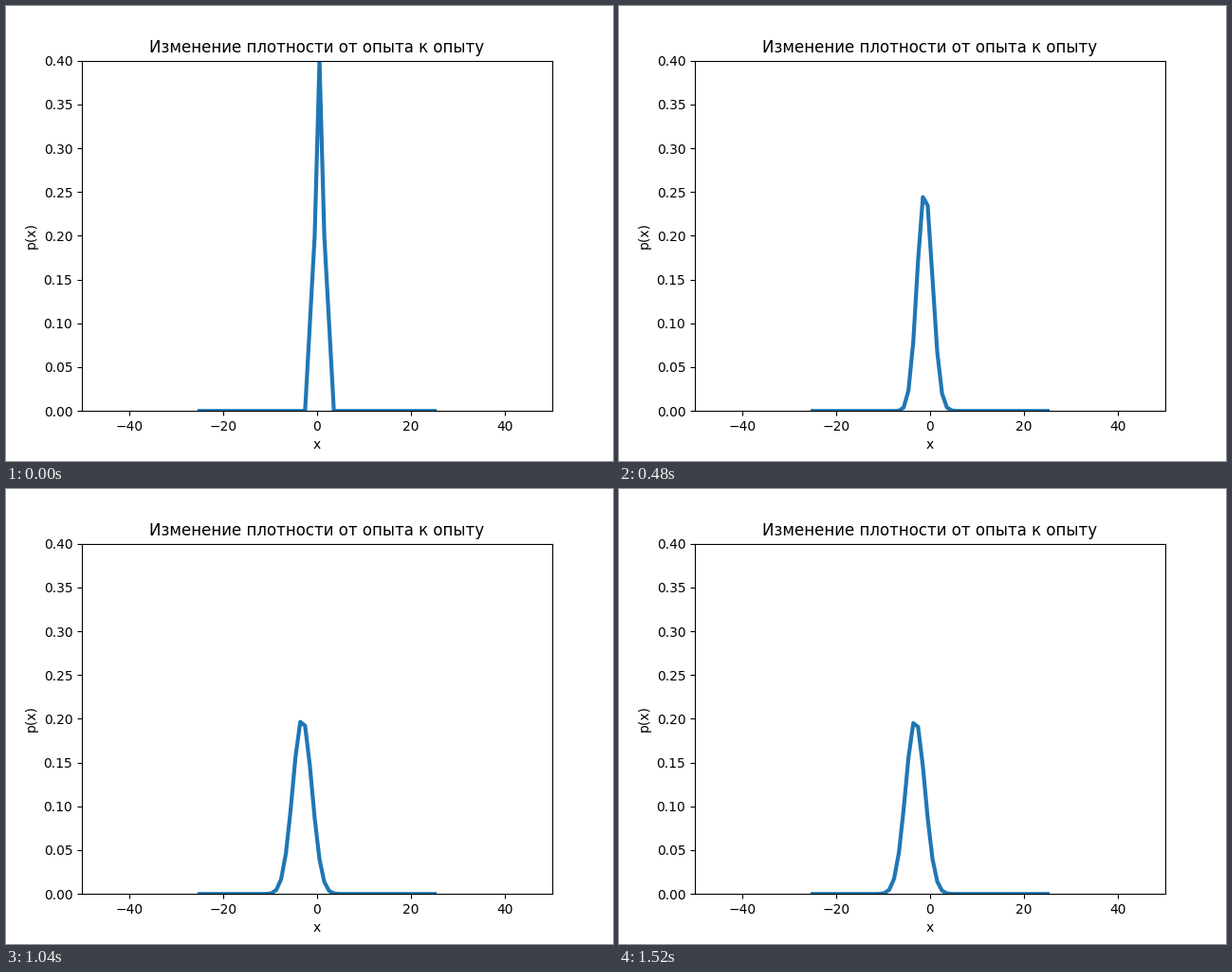
A matplotlib script that plays this animation: 640x480 px, repeating every 1600 ms.

```python
import numpy as np
import matplotlib.pyplot as plt
from matplotlib.animation import FuncAnimation

CELLS = 50
START = 25
FRAMES, INTERVAL = 20, 80
SENSOR_STD = 3.0  # in cells
KERNEL = np.array([0.1, 0.2, 0.4, 0.2, 0.1])

# One step and one reading per experiment, both in cells
STEPS = [0, 0, 1, 1, -1, -1, 1, 1, -1, -1]
READINGS = [18.92, 22.5, 20.9, 21.98, 16.36, 21.8, 23.89, 23.8, 22.51]

cells = np.arange(CELLS)
x = np.linspace(-25, 25, CELLS)


def predict(p, step):
    return np.roll(np.convolve(p, KERNEL, mode="same"), step)


def correct(p, reading):
    p = p * np.exp(-0.5 * ((cells - reading) / SENSOR_STD) ** 2)
    return p / p.sum()


def run_filter():
    p = predict((cells == START).astype(float), 0)
    history = [p]
    for i, step in enumerate(STEPS):
        p = predict(p, step)
        history.append(p)
        if i < len(READINGS):
            p = correct(p, READINGS[i])
            history.append(p)
    return history


densities = run_filter()

fig, ax = plt.subplots(figsize=(6.4, 4.8), dpi=100)
ax.set(xlim=(-50, 50), ylim=(0, 0.4), xlabel="x", ylabel="p(x)",
       title="Изменение плотности от опыта к опыту")
line, = ax.plot(x, densities[0], lw=3)


def update(i):
    line.set_ydata(densities[i])
    return line,


anim = FuncAnimation(fig, update, frames=FRAMES, interval=INTERVAL,
                     repeat=True, repeat_delay=0)
plt.show()
```
